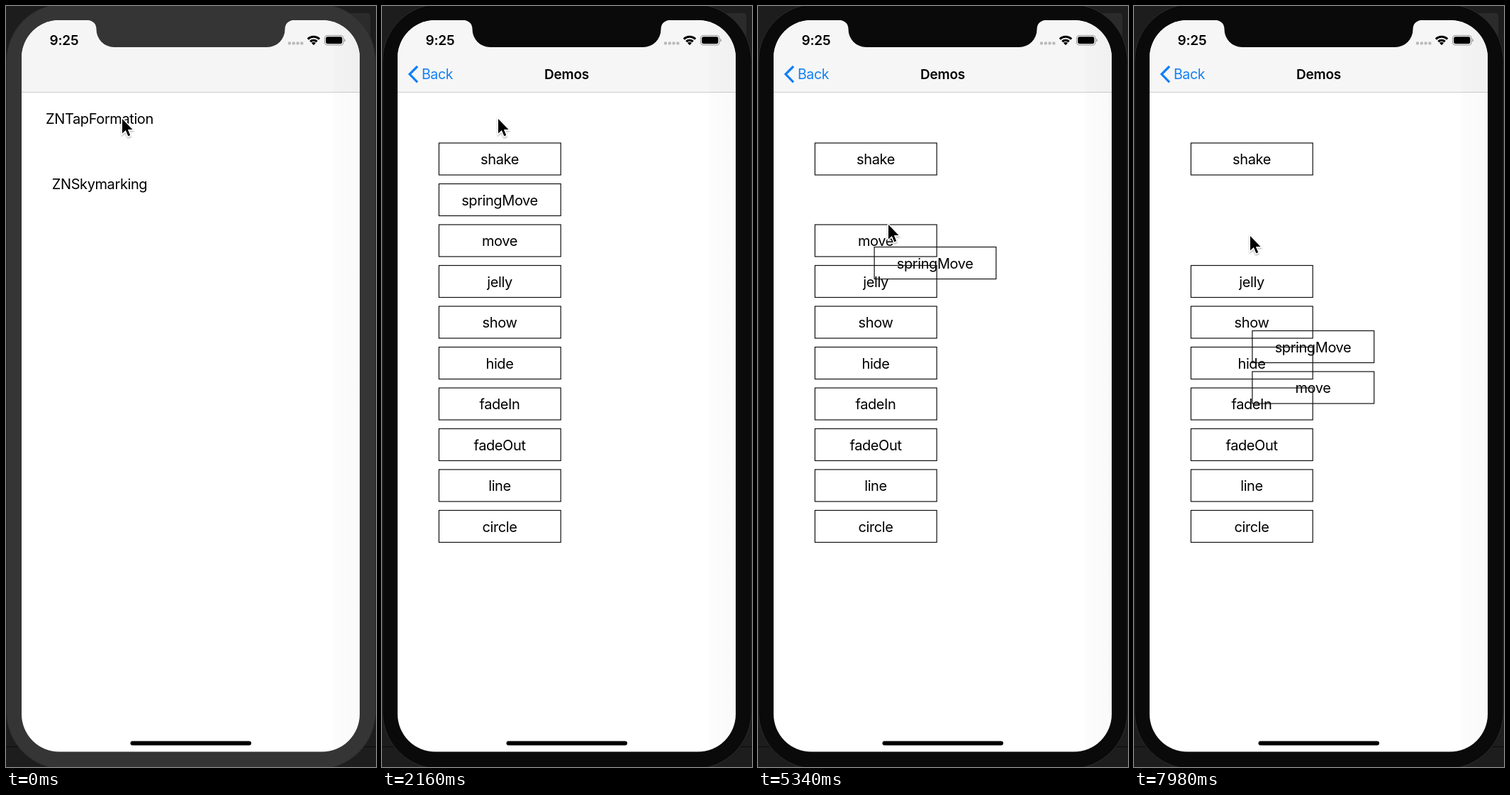
An HTML page for the animation above (8000 ms loop, 522 by 1072 pixels).

```html
<!DOCTYPE html>
<html lang="en">
<head>
<meta charset="utf-8">
<title>Button demos</title>
<style>
  html, body { margin: 0; width: 100%; height: 100%; overflow: hidden; background: #1d1d1d; }
  svg { display: block; width: 100vw; height: 100vh; }
  text { font-family: Inter, Roboto, "Liberation Sans", sans-serif; font-size: 20px; letter-spacing: -.4px; }
  .mid { text-anchor: middle; }
  .bold { font-weight: 600; font-size: 19px; letter-spacing: -.2px; }
  .btn rect { fill: none; stroke: #111; stroke-width: 1.2; }
</style>
</head>
<body>
<svg viewBox="0 0 522 1072" preserveAspectRatio="none">
  <defs>
    <clipPath id="screen"><rect x="22" y="20" width="477" height="1030.5" rx="53"/></clipPath>
    <linearGradient id="edge">
      <stop offset="0" stop-opacity=".01"/>
      <stop offset="1" stop-opacity=".022"/>
    </linearGradient>
    <filter id="soft" x="-50%" y="-50%" width="200%" height="200%">
      <feDropShadow dx="0" dy="1.5" stdDeviation="1.3" flood-opacity=".35"/>
    </filter>
  </defs>

  <rect width="522" height="1072" fill="#1d1d1d"/>
  <rect x="470" y="10" width="44" height="34" rx="4" fill="#2b2b2b"/>
  <path d="M0 1043.5H522" stroke="#0c0c0c"/>
  <rect id="body" x=".8" y="-2.5" width="520.4" height="1077" rx="80" stroke="#2c2c2c"/>

  <g clip-path="url(#screen)">
    <rect id="page" x="22" y="20" width="477" height="1031"/>
    <g id="list">
      <text class="mid" x="132" y="165.5">ZNTapFormation</text>
      <text class="mid" x="132" y="257.5">ZNSkymarking</text>
    </g>
    <g id="demos"></g>
    <rect id="nav" x="22" y="20" width="477" height="101"/>
    <path d="M22 121.5H499" stroke="#000" stroke-opacity=".2" stroke-width="1.2"/>
    <path id="chevron" d="M50 85L39 96L50 107.3" fill="none" stroke="#1280f5" stroke-width="3.2"/>
    <text id="back" y="103" style="font-size:19.5px" fill="#1280f5">Back</text>
    <text id="title" class="mid bold" y="102.8">Demos</text>
    <rect x="462" y="20" width="37" height="1031" fill="url(#edge)"/>

    <text class="bold" x="61.5" y="55">9:25</text>
    <g fill="#b9b9b9">
      <rect x="398" y="50.5" width="4" height="4" rx="1"/>
      <rect x="403.8" y="50.5" width="4" height="4" rx="1"/>
      <rect x="409.6" y="50.5" width="4" height="4" rx="1"/>
      <rect x="415.4" y="50.5" width="4" height="4" rx="1"/>
    </g>
    <path d="M425.8 46.6A11.8 11.8 0 0 1 442.2 46.6M429.2 50.1A7 7 0 0 1 438.8 50.1" fill="none" stroke="#000" stroke-width="2.9"/>
    <path d="M434 55.3L431 52.1A4.3 4.3 0 0 1 437 52.1Z"/>
    <rect x="449.5" y="41.5" width="26.5" height="13.5" rx="3.8" fill="none" stroke="#999" stroke-width="1.1"/>
    <rect x="451.2" y="43.2" width="23.1" height="10.1" rx="2.4"/>
    <path d="M477.4 46A2.6 2.6 0 0 1 477.4 50.6Z" fill="#888"/>
    <rect x="175.5" y="1035.4" width="170.5" height="6" rx="3"/>
  </g>

  <path id="notch" d="M112 19.5Q127.500 20 127.500 33A25 25 0 0 0 152.500 58H368.500A25 25 0 0 0 393.500 33Q393.500 20 409 19.500Z"/>
  <g id="cursor" filter="url(#soft)">
    <path d="M.3 .3V24L5.600 19.200L9 27.200L13.200 25.400L9.900 17.600H17Z" fill="#000" stroke="#fff" stroke-width="1.4"/>
  </g>
</svg>

<script>
const LOOP = 8000, STEP = 60;
const PUSH = 1200, PUSH_END = 1720;
const HALF = 400, DECAY = 1.715 / HALF, FREQ = Math.PI / HALF;
const NAMES = ["shake", "springMove", "move", "jelly", "show", "hide", "fadeIn", "fadeOut", "line", "circle"];
const LATE = ["show", "fadeIn"];
// both moving buttons travel in two legs
const LEG1 = [86.5, 92], LEG2 = [0, 115];
// time, x, y
const POINTER = [
  [0, 163, 157], [2170, 163, 157], [2340, 187, 212], [3400, 187, 212],
  [3620, 188, 307], [3720, 188, 307], [4140, 204, 272], [4740, 204, 272],
  [5220, 183, 306], [5460, 183, 306], [6200, 163, 322]
];

const el = id => document.getElementById(id);
const set = (node, attrs) => { for (const k in attrs) node.setAttribute(k, attrs[k]); };
const shift = (node, x, y = 0) => set(node, { transform: `translate(${x.toFixed(2)} ${y.toFixed(2)})` });
const clamp = v => Math.min(1, Math.max(0, v));
const grey = v => `rgb(${v},${v},${v})`;
const smooth = p => p * p * (3 - 2 * p);

const buttons = {};
NAMES.forEach((name, i) => {
  const g = document.createElementNS("http://www.w3.org/2000/svg", "g");
  const y = 193 + i * 57.5;
  g.setAttribute("class", "btn");
  g.innerHTML = `<rect x="80.4" y="${y}" width="171.8" height="45"/><text class="mid" x="166" y="${y + 30}">${name}</text>`;
  el("demos").append(g);
  buttons[name] = g;
});

function push(t) {
  const s = Math.max(0, t - PUSH) * .01826;
  return 1 - (1 + s) * Math.exp(-s);
}

function spring(t) {
  if (t <= 0) return 0;
  const a = FREQ * t;
  return 1 - Math.exp(-DECAY * t) * (Math.cos(a) + DECAY / FREQ * Math.sin(a));
}

function shake(t) {
  return t <= 0 ? 0 : 222 * Math.exp(-DECAY * t) * Math.sin(FREQ * t);
}

// cubic-bezier(.25, .1, .25, 1)
function ease(p) {
  if (p <= 0 || p >= 1) return clamp(p);
  let lo = 0, hi = 1, u;
  for (let i = 0; i < 20; i++) {
    u = (lo + hi) / 2;
    const x = .75 * u * (1 - u) + u ** 3;
    if (x < p) lo = u; else hi = u;
  }
  return .3 * u * (1 - u) ** 2 + 3 * u * u * (1 - u) + u ** 3;
}

function travel(node, a, b) {
  shift(node, LEG1[0] * a + LEG2[0] * b, LEG1[1] * a + LEG2[1] * b);
}

function pointer(t) {
  let i = POINTER.length - 1;
  while (POINTER[i][0] > t) i--;
  const [t0, x0, y0] = POINTER[i];
  const [t1, x1, y1] = POINTER[i + 1] || [LOOP, x0, y0];
  const p = smooth((t - t0) / (t1 - t0));
  return [x0 + (x1 - x0) * p, y0 + (y1 - y0) * p];
}

function draw(t) {
  const p = push(t), done = t >= PUSH_END;
  const bezel = t < 1140 ? "#353535" : "#0a0a0a";
  set(el("body"), { fill: bezel });
  set(el("notch"), { fill: bezel });
  set(el("page"), { fill: grey(done ? 255 : Math.round(255 - 30 * p)) });
  set(el("nav"), { fill: grey(done ? 246 : Math.round(245 - 4 * p)) });

  shift(el("list"), -142.5 * p);
  set(el("list"), { opacity: done ? 0 : 1 });
  shift(el("demos"), done ? 0 : 477 * (1 - p));
  set(el("demos"), { opacity: t < PUSH ? 0 : 1 });
  LATE.forEach(name => set(buttons[name], { opacity: done ? 1 : 0 }));

  set(el("chevron"), { opacity: p });
  set(el("back"), { x: 56 + 180 * (1 - p), opacity: p });
  set(el("title"), { x: 260.5 + 220 * (1 - p), opacity: p });

  shift(buttons.shake, shake(t - 2360));
  travel(buttons.springMove, spring(t - 4540), spring(t - 5350));
  travel(buttons.move, ease((t - 6840) / 400), ease((t - 7240) / 400));
  shift(el("cursor"), ...pointer(t));
}

function tick() {
  const t = performance.now() % LOOP;
  draw(Math.floor(t / STEP) * STEP);
  requestAnimationFrame(tick);
}
tick();
</script>
</body>
</html>
```
